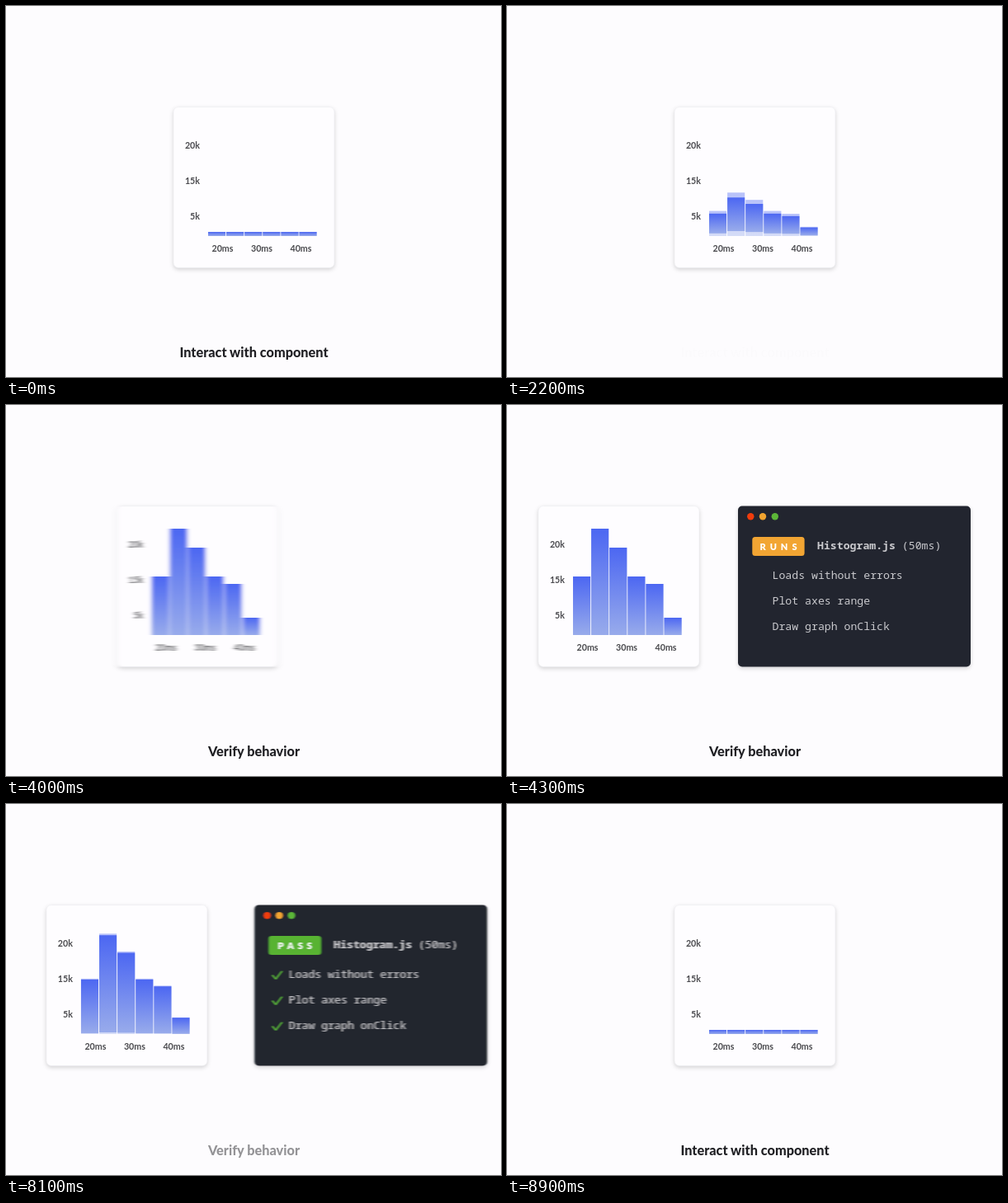
Animation, 600 px wide and 450 px high, one loop 9000 ms. Source, as an HTML page:

```html
<!DOCTYPE html>
<html lang="en">
<head>
<meta charset="utf-8">
<title>Component test loop</title>
<style>
  html, body { margin: 0; width: 100%; height: 100%; overflow: hidden; background: #fdfcfe; }
  svg { display: block; width: 600px; height: 450px; }
  .panel { filter: drop-shadow(0 2px 2.5px rgba(0, 0, 0, .16)); }
  .axis { font: 700 10.7px Lato, sans-serif; fill: #4a4a4e; }
  .caption { font: 800 16.3px Lato, sans-serif; fill: #1f1f23; text-anchor: middle; }
  .code { font: 13.2px "Noto Sans Mono", monospace; fill: #c9c9cd; white-space: pre; }
  .badge { font: 900 11px Lato, sans-serif; fill: #fff; letter-spacing: 5px; text-anchor: middle; }
  .check { fill: none; stroke: #5fbf3a; stroke-width: 1.4; }
</style>
</head>
<body>
<svg viewBox="0 0 600 450">
  <defs>
    <linearGradient id="blue" x2="0" y2="1">
      <stop stop-color="#4c67f2"/><stop offset="1" stop-color="#98abeb"/>
    </linearGradient>
    <filter id="cardBlur" x="-10%" width="120%"><feGaussianBlur/></filter>
    <filter id="termBlur" x="-10%" width="120%"><feGaussianBlur/></filter>
  </defs>

  <g id="card">
    <rect class="panel" x="203" y="122.5" width="195" height="195" rx="6" fill="#fefdff" stroke="#ececf0" stroke-width=".6"/>
    <g id="bars" fill="url(#blue)"></g>
    <g class="axis" text-anchor="end">
      <text x="235" y="172.5">20k</text><text x="235" y="215.5">15k</text><text x="235" y="258.5">5k</text>
    </g>
    <g class="axis" text-anchor="middle">
      <text x="262.5" y="297.7">20ms</text><text x="310" y="297.7">30ms</text><text x="357.5" y="297.7">40ms</text>
    </g>
  </g>

  <g id="term">
    <rect class="panel" x="280" y="122.5" width="282" height="195" rx="5" fill="#22252f"/>
    <circle cx="295.3" cy="135.3" r="4.2" fill="#f03c0c"/>
    <circle cx="310" cy="135.3" r="4.2" fill="#f2a430"/>
    <circle cx="324.8" cy="135.3" r="4.2" fill="#5cb638"/>
    <rect id="badge" x="297.3" y="160" width="63.3" height="23" rx="3.5"/>
    <text id="status" class="badge" x="331.5" y="175.6"></text>
    <text class="code" x="376" y="175.3"><tspan font-weight="700">Histogram.js</tspan> (50ms)</text>
    <g id="lines" class="code"></g>
  </g>

  <text id="first" class="caption" x="300.5" y="426">Interact with component</text>
  <text id="second" class="caption" x="300.5" y="426">Verify behavior</text>
  <path id="cursor" d="M0 0V36L8.5 28.5L14 41L20 38.4L14.5 26.5H26Z" fill="#222" stroke="#fff" stroke-width="2" stroke-linejoin="round"/>
</svg>
<script>
const LOOP = 9000, STEP = 100, SHUTTER = 12, MOVE = 600, FADE = 300;
const GROW = 1931, SLIDE = 3718, RESET = 7947;
const HEIGHTS = [71, 129, 106, 71, 62, 21], BASE = 279, REST = 5;
const $ = id => document.getElementById(id);
const clamp = v => Math.max(0, Math.min(1, v));
const ease = u => u < .5 ? 4 * u ** 3 : 1 - 4 * (1 - u) ** 3;
const ramp = (t, start, length = MOVE) => ease(clamp((t - start) / length));

function add(parent, tag, attrs) {
  const el = document.createElementNS("http://www.w3.org/2000/svg", tag);
  for (const key in attrs) el.setAttribute(key, attrs[key]);
  return parent.appendChild(el);
}

const bars = HEIGHTS.map((height, i) => {
  const place = { x: 245 + 22.1 * i, width: 21.1 };
  return { height, soft: add($("bars"), "rect", { ...place, opacity: .4 }), body: add($("bars"), "rect", place) };
});

const checks = ["Loads without errors", "Plot axes range", "Draw graph onClick"].map((line, i) => {
  const y = 207 + 31 * i;
  add($("lines"), "text", { x: 321.5, y: y + 4.2 }).textContent = line;
  return add($("lines"), "path", { class: "check", d: `M301.5 ${y + .5}l4.3 4.7l7.6 -9.6` });
});

const growth = t => ramp(t, GROW) - ramp(t, RESET);
const cardX = t => -165 * (ramp(t, SLIDE) - ramp(t, RESET));
const termX = t => 320 * ramp(t, RESET);
const travel = (pos, t) => Math.abs(pos(t + SHUTTER / 2) - pos(t - SHUTTER / 2));

function blur(target, amount) {
  const name = target.id + "Blur";
  $(name).firstElementChild.setAttribute("stdDeviation", `${amount} 0`);
  if (amount > .2) target.setAttribute("filter", `url(#${name})`);
  else target.removeAttribute("filter");
}

function setBar(rect, top, bottom) {
  rect.setAttribute("y", top);
  rect.setAttribute("height", Math.max(0, bottom - top));
}

function drawCard(t) {
  const press = 1 - .03 * (ramp(t, 1300, 200) - ramp(t, 1500, 250));
  $("card").setAttribute("transform",
    `translate(${300.5 + cardX(t)} 220) scale(${press}) translate(-300.5 -220)`);
  blur($("card"), travel(cardX, t) * .29);
  for (const { height, soft, body } of bars) {
    const range = height - REST;
    const top = BASE - REST - range * growth(t);
    const inset = range * travel(growth, t);
    setBar(soft, top - inset / 2, BASE);
    setBar(body, top + inset / 2, BASE - inset);
  }
}

function drawTerminal(t) {
  const passed = t >= 4900;
  $("term").setAttribute("transform", `translate(${termX(t)} 0)`);
  $("term").setAttribute("opacity", t < RESET + MOVE ? ramp(t, 4000, 250) : 0);
  blur($("term"), travel(termX, t) * .25);
  $("badge").setAttribute("fill", passed ? "#58b333" : "#f2a533");
  $("status").textContent = passed ? "PASS" : "RUNS";
  checks.forEach((check, i) => check.setAttribute("opacity", ramp(t, 4350 + 150 * i, 150)));
}

function drawCursor(t) {
  const u = ramp(t, 200, 800), v = 1 - u;
  const curve = (a, b, c) => a * v * v + 2 * b * u * v + c * u * u;
  $("cursor").setAttribute("transform", `translate(${curve(545, 420, 300)} ${curve(388, 252, 222)})`);
  $("cursor").setAttribute("opacity", ramp(t, 0, 200) - ramp(t, 1700, 250));
}

function draw(t) {
  drawCard(t);
  drawTerminal(t);
  drawCursor(t);
  $("first").setAttribute("opacity", 1 - ramp(t, GROW, FADE) + ramp(t, 8300, FADE));
  $("second").setAttribute("opacity", ramp(t, 2400, FADE) - ramp(t, RESET, FADE));
}

const begin = performance.now();
function tick() {
  const now = Math.max(0, performance.now() - begin) % LOOP;
  draw(Math.floor(now / STEP) * STEP);
  requestAnimationFrame(tick);
}
tick();
</script>
</body>
</html>
```
